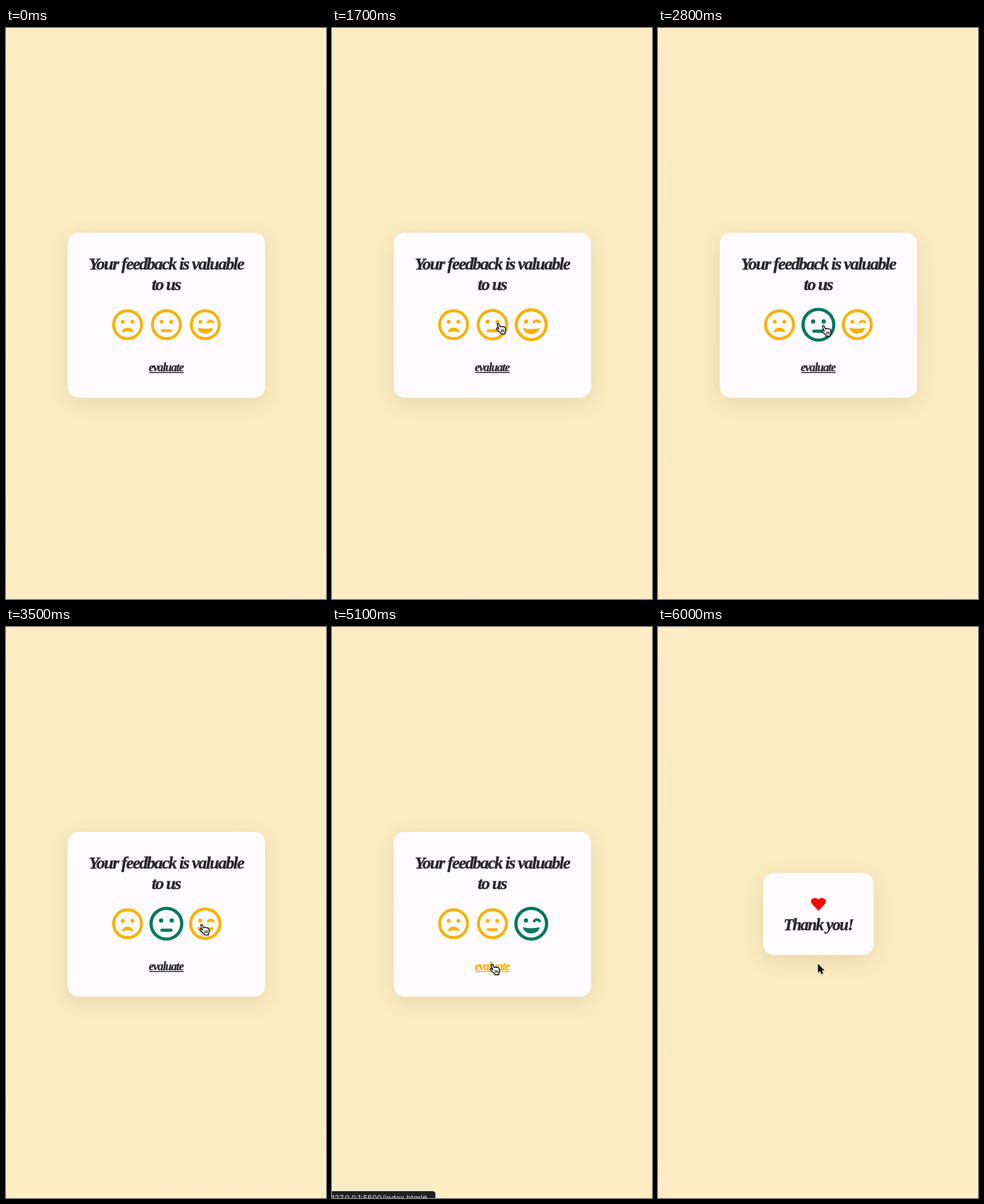
Write an HTML page that moves like this. It is 560 px wide and 1000 px high and loops after 7800 ms.

```html
<!DOCTYPE html>
<html lang="en">
<head>
<meta charset="utf-8">
<title>Feedback card</title>
<style>
  html, body { margin: 0; width: 100%; height: 100%; overflow: hidden; background: #fdebc3; }
  svg.stage { display: block; width: 100vw; height: 100vh; }
  .card { fill: #fdfbfe; filter: url(#shadow); }
  .script {
    font: italic bold 30px "Pacifico", "Liberation Serif", "Noto Serif", serif;
    letter-spacing: -.06em; text-anchor: middle;
    fill: #29282c; stroke: #29282c; stroke-width: .5px;
  }
  .face { --c: #fbb104; fill: var(--c); }
  .face.on { --c: #02785f; }
  .line, .mouth { stroke: var(--c); stroke-linecap: round; stroke-linejoin: round; }
  .line { fill: none; }
  .mouth { stroke-width: 16; }
  #link text { font-size: 20.5px; stroke-width: .3px; }
  #link line { stroke: #29282c; stroke-width: 1.6; }
  #link.hot text { fill: #fbb104; stroke: #fbb104; }
  #link.hot line { stroke: #fbb104; }
  #cursor { filter: url(#lift); }
  #status text { font: 13.5px Inter, Roboto, sans-serif; fill: #d9d9da; }
</style>
</head>
<body>
<svg class="stage" viewBox="0 0 560 1000" preserveAspectRatio="none">
  <defs>
    <linearGradient id="wash" x2="0" y2="1">
      <stop offset="0" stop-color="#feecc5"/>
      <stop offset=".5" stop-color="#fdebc1"/>
      <stop offset="1" stop-color="#feecc4"/>
    </linearGradient>
    <filter id="shadow" x="-40%" y="-60%" width="180%" height="220%" color-interpolation-filters="sRGB">
      <feDropShadow dx="0" dy="9" stdDeviation="17" flood-color="#3a2a00" flood-opacity=".11"/>
    </filter>
    <filter id="lift" x="-40%" y="-40%" width="180%" height="180%" color-interpolation-filters="sRGB">
      <feDropShadow dx="0" dy="1" stdDeviation="1" flood-opacity=".35"/>
    </filter>
    <g id="ring">
      <circle class="line" cx="256" cy="256" r="232" stroke-width="48"/>
      <circle cx="176" cy="208" r="32"/>
    </g>
    <circle id="eye" cx="336" cy="208" r="32"/>
  </defs>
  <rect width="560" height="1000" fill="url(#wash)"/>

  <g id="ask">
    <rect class="card" x="108" y="358.7" width="345.4" height="288.7" rx="19"/>
    <text class="script" x="280.5" y="423">Your feedback is valuable</text>
    <text class="script" x="280" y="459">to us</text>
    <g class="face">
      <use href="#ring"/><use href="#eye"/>
      <path class="mouth" d="M170 374Q186 312 256 312T342 374Q256 344 170 374Z"/>
    </g>
    <g class="face">
      <use href="#ring"/><use href="#eye"/>
      <path class="line" stroke-width="48" d="M188 354H325"/>
    </g>
    <g class="face">
      <use href="#ring"/>
      <path class="line" stroke-width="40" d="M300 216Q342 172 383 214"/>
      <path class="mouth" d="M138 318Q256 346 374 318Q348 396 256 396T138 318Z"/>
    </g>
    <g id="link">
      <text class="script" x="280" y="601">evaluate</text>
      <line x1="250.5" x2="311" y1="603.4" y2="603.4"/>
    </g>
  </g>

  <g id="thanks">
    <rect class="card" x="184" y="431" width="193.4" height="143.4" rx="19"/>
    <path fill="#f00" transform="translate(280.7 486)" d="M0 11.2L-11-.8C-18-8-6-16 0-8.5 6-16 18-8 11-.8Z"/>
    <text class="script" x="280.5" y="531" style="font-size:28.5px">Thank you!</text>
  </g>

  <g id="status">
    <path fill="#202022" d="M0 988H176a5 5 0 0 1 5 5V1000H0z"/>
    <text x="-1" y="1004.6">127.0.0.1:5500/index.html#</text>
  </g>

  <g id="cursor">
    <g id="hand" transform="translate(-3.6 -1.4)" stroke="#000" stroke-width="1.4" stroke-linejoin="round" stroke-linecap="round">
      <path fill="#fff" d="M5.5 11.5L2.6 3.2C2 1.4 4.4.4 5.2 2.2L7.6 7.6Q9 5 10.6 7.2 12.4 5.6 13.6 7.7 15.8 6.8 16.4 8.6 17.6 12.6 16.8 15L15.9 17.4V19.5H8.9L8.4 17.6Q4.6 15 1.6 11.4C.2 9.8 2 8.2 3.6 9.2Z"/>
      <path fill="none" stroke-width="1.1" d="M9.6 12.2v4M11.8 12.2v4M14 12.2v4"/>
    </g>
    <path id="arrow" stroke="#fff" stroke-width="1.4" paint-order="stroke" d="M0 0V15.5L3.6 12.2 6 18 8.9 16.8 6.5 11.2H11.3Z"/>
  </g>
</svg>
<script>
const LOOP = 7800, STEP = 100, ENTER = 100, DONE = 5300;
const PICK_MID = 2800, PICK_RIGHT = 3900;
const GROW = .1, FADE = 250, FACE_Y = 519.6;
const faceX = i => 212.7 + 68 * i;

// Cursor stops: time, x, y
const stops = [
  [ENTER, 33, 787], [800, 122, 602], [1100, 292, 509], [1450, 350, 518],
  [2000, 212, 517], [2200, 291, 518], [3200, 288, 523], [3480, 342, 521],
  [4200, 340, 535], [4750, 279, 592], [DONE, 280, 590]
];

const $ = id => document.getElementById(id);
const faces = [...document.querySelectorAll(".face")];
const show = (id, on) => $(id).setAttribute("visibility", on ? "visible" : "hidden");
const clamp = v => Math.max(0, Math.min(1, v));
const smooth = k => k * k * (3 - 2 * k);

function cursorAt(t) {
  const next = stops.findIndex(s => s[0] > t);
  if (next < 1) return stops.at(next).slice(1);
  const [t0, x0, y0] = stops[next - 1], [t1, x1, y1] = stops[next];
  const k = smooth((t - t0) / (t1 - t0));
  return [x0 + (x1 - x0) * k, y0 + (y1 - y0) * k];
}

const overFace = (i, [x, y]) => Math.hypot(x - faceX(i), y - FACE_Y) < 28;
const overLink = ([x, y]) => x > 250 && x < 311 && y > 583 && y < 607;
const pickedAt = t => t < PICK_MID ? -1 : t < PICK_RIGHT ? 1 : 2;

// Hovered or picked faces grow, the others shrink back, at a steady rate
function growth(i, t) {
  const dt = 10;
  let g = 0;
  for (let u = Math.max(0, t - 1000); u < t; u += dt) {
    const up = pickedAt(u) === i || overFace(i, cursorAt(u));
    g = clamp(g + (up ? dt : -dt) / FADE);
  }
  return g;
}

function draw(t) {
  const asking = t < DONE, pos = cursorAt(t), hot = overLink(pos);
  const hand = asking && (hot || faces.some((_, i) => overFace(i, pos)));

  show("ask", asking);
  show("thanks", !asking);
  faces.forEach((face, i) => {
    const s = (1 + GROW * growth(i, t)) * 54 / 512;
    face.setAttribute("transform",
      `translate(${faceX(i)} ${FACE_Y}) scale(${s}) translate(-256 -256)`);
    face.classList.toggle("on", pickedAt(t) === i);
  });
  $("link").classList.toggle("hot", hot);
  $("status").setAttribute("opacity", clamp(Math.min((t - 4800) / 200, (5600 - t) / 300)));
  $("cursor").setAttribute("transform", `translate(${pos})`);
  show("hand", hand);
  show("arrow", !hand && t >= ENTER);
}

const start = performance.now();
function tick() {
  const t = (performance.now() - start) % LOOP;
  draw(Math.floor(t / STEP) * STEP);
  requestAnimationFrame(tick);
}
tick();
</script>
</body>
</html>
```
